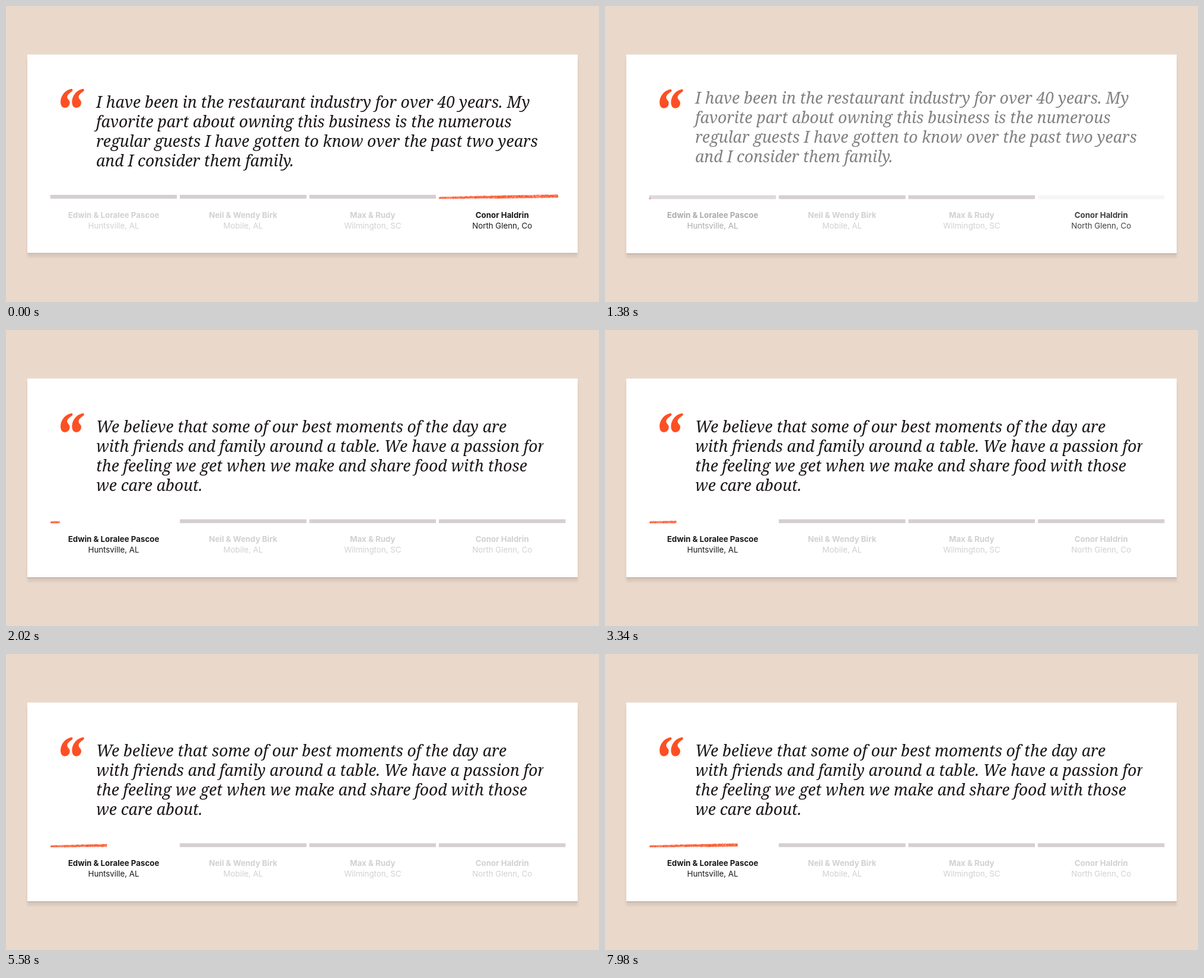
Recreate the animation shown at these times as an HTML page with a canvas. Size 1000 by 500 pixels, loop 8 s.

```html
<!DOCTYPE html>
<html lang="en">
<head>
<meta charset="utf-8">
<title>Guest quotes</title>
<style>
  html, body { margin: 0; height: 100%; overflow: hidden; background: #ead9cb; }
  canvas { display: block; }
</style>
</head>
<body>
<canvas id="stage" width="1000" height="500"></canvas>
<script>
const ctx = document.getElementById('stage').getContext('2d');
const LOOP = 8000, SWITCH = 1300, SPEED = 0.0223;
const BAR_X = 74.7, BAR_STEP = 218.4, BAR_W = 213.6;
const ORANGE = '#fc5024', INK = '#1d1819';

const quotes = [
  ['I have been in the restaurant industry for over 40 years. My',
   'favorite part about owning this business is the numerous',
   'regular guests I have gotten to know over the past two years',
   'and I consider them family.'],
  ['We believe that some of our best moments of the day are',
   'with friends and family around a table. We have a passion for',
   'the feeling we get when we make and share food with those',
   'we care about.']
];
const people = [
  ['Edwin & Loralee Pascoe', 'Huntsville, AL'],
  ['Neil & Wendy Birk', 'Mobile, AL'],
  ['Max & Rudy', 'Wilmington, SC'],
  ['Conor Haldrin', 'North Glenn, Co']
];
const mark = new Path2D('M110 140 C101 141.5 92 150.5 92 162 C92 168.5 95 172 99.3 172 ' +
  'C103.8 172 107.6 168.4 107.6 163.3 C107.6 158.6 103.2 157.8 103.2 153.8 ' +
  'C103.2 149.6 108 146.6 111 144.4 C113.2 142.6 112.6 139.6 110 140 Z');

// CSS "ease" timing: cubic-bezier(.25, .1, .25, 1)
function ease(x) {
  if (x <= 0) return 0;
  if (x >= 1) return 1;
  const bezier = (a, b, s) => 3 * a * s * (1 - s) ** 2 + 3 * b * s * s * (1 - s) + s ** 3;
  let lo = 0, hi = 1;
  for (let i = 0; i < 24; i++) {
    const mid = (lo + hi) / 2;
    if (bezier(0.25, 0.25, mid) < x) lo = mid; else hi = mid;
  }
  return bezier(0.1, 1, lo);
}

function seeded(seed) {
  return () => (seed = (seed * 16807) % 2147483647) / 2147483647;
}

// Rough crayon line, rising and thickening to the right
function makeCrayon() {
  const canvas = document.createElement('canvas');
  canvas.width = 215;
  canvas.height = 14;
  const c = canvas.getContext('2d'), rnd = seeded(71);
  const middle = x => 7.7 - x * 0.015;
  const half = x => 1.1 + Math.min(1, x / 120);
  c.fillStyle = ORANGE;
  for (let x = 0; x < BAR_W; x++) {
    const up = half(x) + rnd() * 0.8, down = half(x) + rnd() * 0.8;
    c.fillRect(x, middle(x) - up, 1, up + down);
  }
  c.fillStyle = 'rgba(255,255,255,.55)';
  for (let i = 0; i < 300; i++) {
    const x = rnd() * BAR_W;
    c.fillRect(x, middle(x) + (rnd() * 2 - 1) * half(x), 0.6 + rnd(), 0.5 + rnd() * 0.5);
  }
  return canvas;
}
const crayon = makeCrayon();

function drawCard(bottom, edge) {
  ctx.fillStyle = '#ead9cb';
  ctx.fillRect(0, 0, 1000, 500);
  ctx.save();
  ctx.shadowColor = 'rgba(60,40,30,.1)';
  ctx.shadowBlur = 4;
  ctx.shadowOffsetY = 6;
  ctx.fillStyle = edge;
  ctx.fillRect(36, 82, 928, bottom - 82);
  ctx.restore();
  ctx.fillStyle = '#fff';
  ctx.fillRect(36, 82, 928, bottom - 83);
}

function drawQuote(lines, progress) {
  ctx.save();
  ctx.beginPath();
  ctx.rect(140, 100, 766.5, 200);
  ctx.clip();
  ctx.globalAlpha = progress;
  ctx.fillStyle = INK;
  ctx.textAlign = 'left';
  ctx.font = 'italic 26.5px "Noto Serif", serif';
  lines.forEach((line, i) => ctx.fillText(line, 152, 172 + i * 33 - 17 * (1 - progress)));
  ctx.restore();
}

function drawTab(i, active) {
  const x = BAR_X + i * BAR_STEP, center = x + BAR_W / 2;
  ctx.globalAlpha = 1 - active;
  ctx.fillStyle = '#d6cfd2';
  ctx.fillRect(x, 319, BAR_W, 6.5);
  ctx.globalAlpha = 0.2 + 0.8 * active;
  ctx.fillStyle = INK;
  ctx.textAlign = 'center';
  ctx.font = '700 13.3px Inter, sans-serif';
  ctx.fillText(people[i][0], center, 357.5);
  ctx.font = '400 13.3px Inter, sans-serif';
  ctx.fillText(people[i][1], center, 375.5);
  ctx.globalAlpha = 1;
}

function drawStroke(i, width) {
  const x = BAR_X + i * BAR_STEP;
  ctx.save();
  ctx.beginPath();
  ctx.rect(x, 310, Math.min(width, BAR_W), 24);
  ctx.clip();
  ctx.drawImage(crayon, x, 316.5);
  ctx.restore();
}

function draw(t) {
  const settled = t >= 400;
  drawCard(settled ? 419 : 418, settled ? '#a09b99' : '#bcb2ab');
  ctx.save();
  ctx.translate(0, settled ? 0.7 : 0);

  ctx.fillStyle = ORANGE;
  ctx.fill(mark);
  ctx.save();
  ctx.translate(19.3, 0);
  ctx.fill(mark);
  ctx.restore();

  if (t < SWITCH + 300) drawQuote(quotes[0], 1 - ease((t - SWITCH) / 300));
  else drawQuote(quotes[1], ease((t - SWITCH - 300) / 460));

  const change = ease((t - SWITCH) / 500);
  [change, 0, 0, 1 - change].forEach((active, i) => drawTab(i, active));
  if (t < SWITCH) drawStroke(3, 201 + t * SPEED);
  else drawStroke(0, (t - SWITCH) * SPEED);
  ctx.restore();
}

function tick() {
  draw(performance.now() % LOOP);
  requestAnimationFrame(tick);
}
tick();
</script>
</body>
</html>
```
